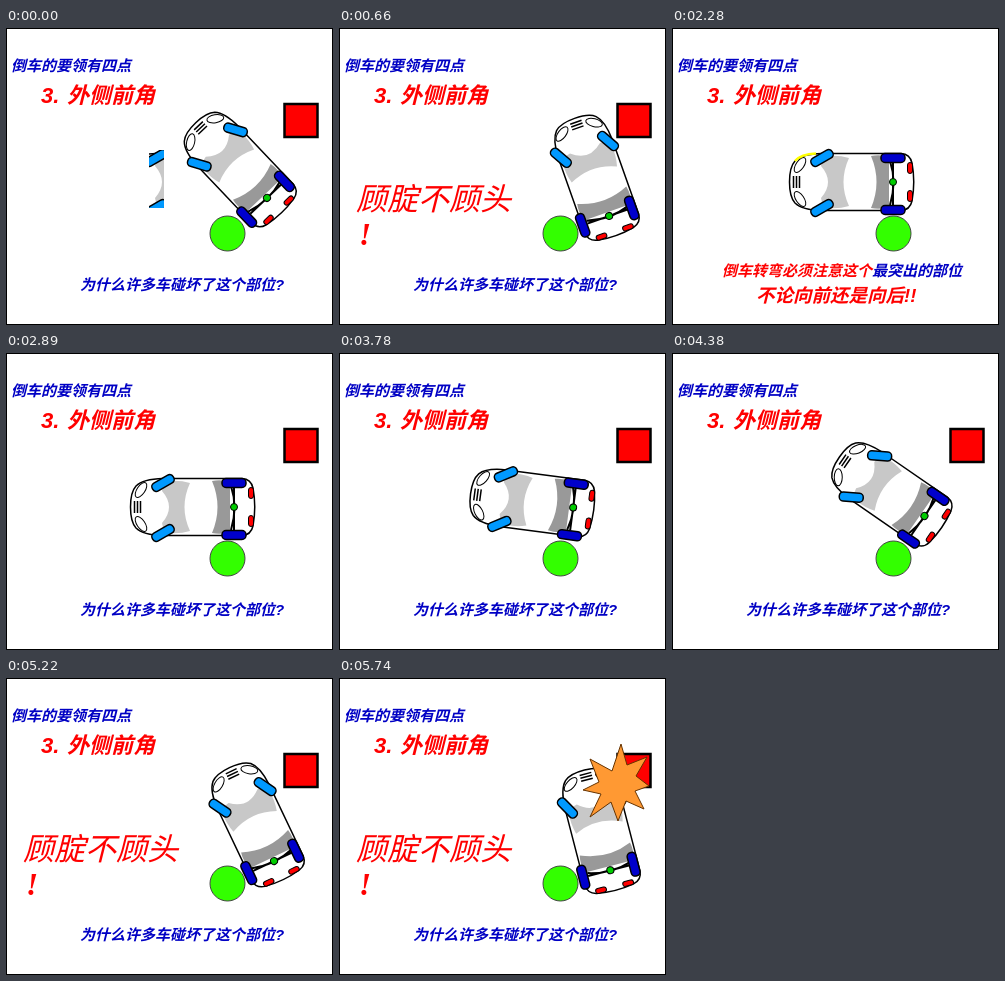
An HTML page that plays this animation: 327 by 297 pixels, repeating every 5.88 s.

```html
<!DOCTYPE html>
<html lang="zh">
<head>
<meta charset="utf-8">
<style>
html, body { margin: 0; width: 100%; height: 100%; overflow: hidden; background: #fff; }
svg { display: block; width: 327px; height: 297px; }
text { font: italic bold 15px "Liberation Sans", "Noto Sans CJK SC", "Noto Sans CJK", sans-serif; }
.blue { fill: #0000c4; }
.red { fill: #f00; }
.ink { stroke: #000; stroke-width: 1.5; }
</style>
</head>
<body>
<svg viewBox="0 0 327 297">
  <defs>
    <clipPath id="strip"><rect x="143" y="122" width="15" height="58"/></clipPath>
    <g id="car">
      <path class="ink" fill="#fff" d="M150 125.5H229Q238 126 240 135Q243.500 154 240 173Q238 182 229 182.500H150Q130 182 123 175Q117.500 169 117.500 154Q117.500 139 123 133Q130 126 150 125.500Z"/>
      <path fill="#c8c8c8" d="M149 138Q150 130 156 128Q167 127 177 130Q166 154 177 178Q167 181 156 180Q150 178 149 170Q163 154 149 138Z"/>
      <path fill="#999" d="M199 128Q208 126 217 129V179Q208 182 199 180Q210 154 199 128Z"/>
      <g id="lamp">
        <ellipse cx="128" cy="137" rx="8.500" ry="4" transform="rotate(-56 128 137)" fill="#fff" stroke="#000"/>
        <rect class="ink" x="235.500" y="134.500" width="5" height="11" rx="2.500" fill="#f00" style="stroke-width:1"/>
      </g>
      <use href="#lamp" transform="matrix(1 0 0 -1 0 308)"/>
      <path class="ink" d="M121.500 148V160M124.500 148V160M127.500 148V160"/>
      <path fill="none" stroke="#000" stroke-width="2" d="M221 133V177M218 133Q225 154 218 177"/>
      <circle class="ink" cx="221" cy="154" r="3.500" fill="#0c0" style="stroke-width:1"/>
      <g id="wheels" class="ink"></g>
    </g>
  </defs>
  <rect width="327" height="297" fill="#fff"/>
  <rect id="wall" x="278.500" y="76" width="33" height="33" fill="#f00" stroke="#000" stroke-width="2.500"/>
  <use id="ghost" href="#car" clip-path="url(#strip)"/>
  <use id="mover" href="#car"/>
  <path id="mark" d="M123 133Q129 126 144 125.500" fill="none" stroke="#ff0" stroke-width="2.500"/>
  <circle cx="221.500" cy="205.500" r="17.500" fill="#3f0" stroke="#444"/>
  <text class="blue" x="5" y="43">倒车的要领有四点</text>
  <g class="red">
    <text x="35" y="75" style="font-size:22px">3.</text>
    <text x="61" y="75" style="font-size:22px">外侧前角</text>
  </g>
  <g id="shout" class="red">
    <text x="17" y="182" style="font-size:31px;font-weight:500">顾腚不顾头</text>
    <text x="20" y="217" style="font-size:31px;font-family:'Liberation Serif',serif">!</text>
  </g>
  <text id="ask" class="blue" x="74" y="262">为什么许多车碰坏了这个部位?</text>
  <text id="warn" class="red" x="50" y="248">倒车转弯必须注意这个<tspan class="blue">最突出的部位</tspan></text>
  <text id="both" class="red" x="84" y="274" style="font-size:18.500px">不论向前还是向后!!</text>
  <path id="star" fill="#f93" stroke="#630" d="M282 66L288 87L308 79L297 98L310 108L296 113L305 131L287 123L279 143L272 124L251 139L262 116L244 112L260 104L251 81L273 93Z"/>
  <rect x=".5" y=".5" width="326" height="296" fill="none" stroke="#000"/>
</svg>
<script>
const LOOP = 5880;
const $ = id => document.getElementById(id);
const show = (id, on) => $(id).setAttribute('visibility', on ? 'visible' : 'hidden');
const count = (times, t) => times.filter(v => v <= t).length;

function wheel(x, y, tilt, fill) {
  return `<rect x="${x - 12}" y="${y - 4.5}" width="24" height="9" rx="4" fill="${fill}" transform="rotate(${tilt} ${x} ${y})"/>`;
}
$('wheels').innerHTML =
  wheel(150, 130, -30, '#09f') + wheel(150, 180, -30, '#09f') +
  wheel(221, 130, 0, '#00c') + wheel(221, 182, 0, '#00c');

// turn steps of the cut-in first pass and of the full second pass
const FIRST = [100, 250, 350, 460, 560, 660, 770];
const SECOND = [3780, 3880, 3980, 4090, 4190, 4290, 4380, 4490, 4600, 4700,
  4810, 4920, 5010, 5120, 5220, 5330, 5440, 5550];
const BLINK = [1290, 1500, 1610, 1820, 2280, 2370, 2580, 2680];
const BURST = [[870, .6], [970, 1], [1080, 1.6], [1180, 2.3], [1290, 0], [5640, .6], [5740, 1]];

// step, angle, sideways shift
const KEYS = [[-1, 0, 7], [0, 7.5, 6.5], [6, 34.6, 2.5], [10, 46.5, 3],
  [14, 64.5, 1], [16, 70.5, 1], [17, 75.5, 1]];

function pose(step) {
  const i = Math.max(1, KEYS.findIndex(k => k[0] >= step));
  const a = KEYS[i - 1], b = KEYS[i];
  const p = (step - a[0]) / (b[0] - a[0]);
  return [a[1] + (b[1] - a[1]) * p, a[2] + (b[2] - a[2]) * p];
}

function draw(t) {
  const lesson = t >= 1290 && t < 2890;
  const step = t < 1290 ? 10 + count(FIRST, t) : count(SECOND, t) - 1;
  const [angle, dx] = lesson ? [0, 0] : pose(step);
  $('mover').setAttribute('transform', `translate(${dx} 0) rotate(${angle} 221 205)`);

  const size = BURST.reduce((s, [at, v]) => at <= t ? v : s, 0);
  $('star').setAttribute('transform', `translate(277 105) scale(${size}) translate(-277 -105)`);
  show('star', size > 0);

  show('ghost', t < 100);
  show('wall', !lesson);
  show('ask', !lesson);
  show('warn', lesson);
  show('both', lesson && t >= 1960);
  show('shout', !lesson && step >= 11);
  show('mark', lesson && count(BLINK, t) % 2 === 1);
}

const start = performance.now();
function tick() {
  draw((performance.now() - start) % LOOP);
  requestAnimationFrame(tick);
}
tick();
</script>
</body>
</html>
```
